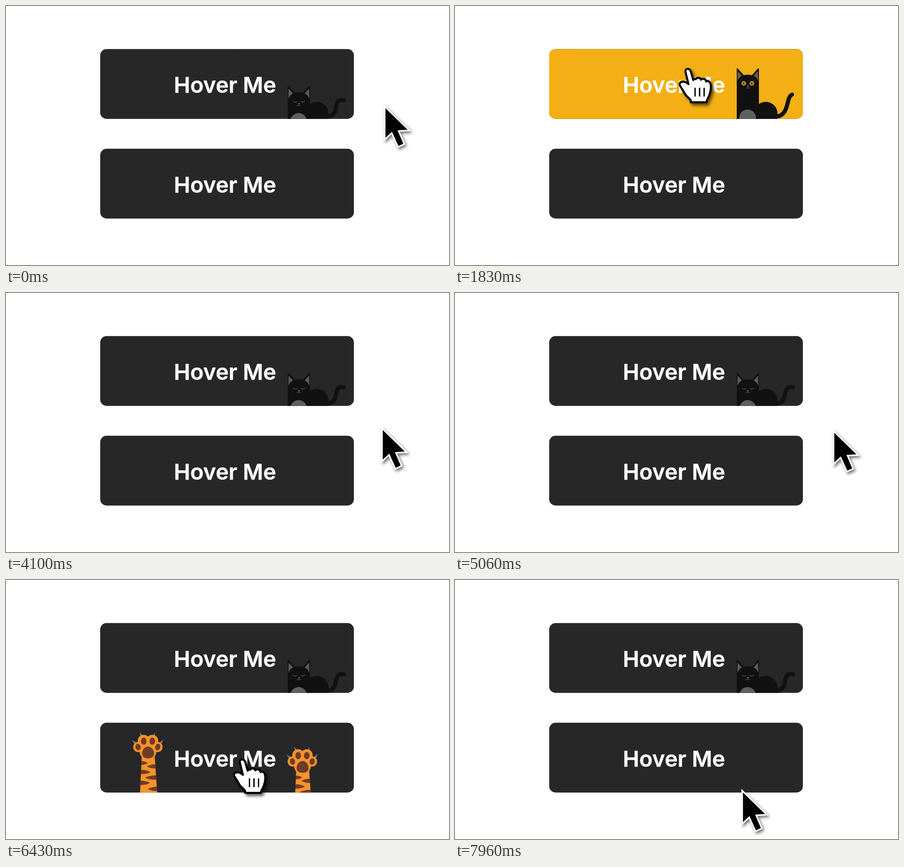
Write an HTML page that moves like this. It is 978 by 573 pixels and loops after 8 s.

```html
<!DOCTYPE html>
<html lang="en">
<head>
<meta charset="utf-8">
<title>Cat buttons</title>
<style>
  html, body { margin: 0; width: 100%; height: 100%; overflow: hidden; background: #fff; }
  svg { display: block; width: 100vw; height: 100vh; }
  text { font: 600 48.5px Inter, Roboto, sans-serif; fill: #fff; stroke: #fff; stroke-width: .5; stroke-linejoin: round; text-anchor: middle; }
  #arrow { filter: drop-shadow(3px 4px 3px rgba(0, 0, 0, .55)); }
  #hand { filter: drop-shadow(4px 5px 3px rgba(0, 0, 0, .6)); }
</style>
</head>
<body>
<svg viewBox="0 0 978 573">
  <defs>
    <rect id="box" x="208" y="95.3" width="560" height="154.4" rx="14"/>
    <clipPath id="clipTop"><use href="#box"/></clipPath>
    <clipPath id="clipLow"><use href="#box" y="220.5"/></clipPath>
    <g id="ear">
      <path d="M622 178.5Q622 175.5 624.5 177.5L640 195L622 212Z" fill="#111"/>
      <path d="M624 183L634.5 194.5Q626 198 623.4 206Z" fill="#5c5c5c"/>
    </g>
    <g id="eye">
      <circle r="5" fill="#f5bb24"/>
      <circle r="3.7" fill="none" stroke="#5d430c" stroke-width=".8"/>
      <ellipse rx="1.9" ry="2.3" fill="#111"/>
      <circle cx=".8" cy="-1" r=".6" fill="#fff"/>
    </g>
    <g id="paw">
      <g fill="#777">
        <path d="M295 337L302 344L297 347Z"/>
        <path d="M328 336L325.5 347L330 347Z"/>
        <path d="M278 354L287 359L284 364Z"/>
        <path d="M347.500 353L339 359L343 363Z"/>
      </g>
      <g fill="#f7932a">
        <path d="M300 385H328L331 430L334.500 480V620H295.500V480Z"/>
        <circle cx="292" cy="369.500" r="11.200"/>
        <circle cx="304" cy="355.500" r="13"/>
        <circle cx="323" cy="355.500" r="13"/>
        <circle cx="334.500" cy="369.500" r="11.200"/>
        <ellipse cx="313.500" cy="379" rx="18.500" ry="19"/>
      </g>
      <g fill="#6e3d24">
        <ellipse cx="291.500" cy="369.500" rx="5.800" ry="7.200" transform="rotate(-15 291.500 369.500)"/>
        <ellipse cx="304" cy="356.500" rx="6.200" ry="8"/>
        <ellipse cx="323" cy="356.500" rx="6.200" ry="8"/>
        <ellipse cx="335" cy="369.500" rx="5.800" ry="7.200" transform="rotate(15 335 369.500)"/>
        <path d="M313.500 368.500C321 368.500 327 376 327 384C327 392 320 394.500 313.500 394.500C307 394.500 300.500 392 300.500 384C300.500 376 306 368.500 313.500 368.500Z"/>
        <path d="M299.300 401Q308 401 313 405Q307 409 298.800 409Z"/>
        <path d="M329.500 407.500Q318 408 311 412.500Q319 417 330.200 417Z"/>
        <path d="M298.300 420Q312 420 319 425.500Q310 430 297.700 429.500Z"/>
        <path d="M331.200 432Q316 432.500 307 437.500Q318 442.500 332 442Z"/>
        <path d="M296.900 444Q310 444 318 449Q309 454 296.300 453.500Z"/>
        <path d="M333.300 457Q321 457.500 313 462.500Q322 467 334 467Z"/>
      </g>
    </g>
  </defs>

  <use href="#box" fill="#272727"/>
  <use id="glow" href="#box" fill="#f3af13"/>
  <use href="#box" y="220.5" fill="#272727"/>
  <text x="483.5" y="192">Hover Me</text>
  <text x="483.5" y="412.5">Hover Me</text>

  <g clip-path="url(#clipTop)">
    <path id="tail" fill="none" stroke="#111" stroke-width="9" stroke-linecap="round"/>
    <path d="M660 250V238A26 26 0 0 1 712 238V250Z" fill="#111"/>
    <g id="head">
      <use href="#ear"/>
      <use href="#ear" transform="matrix(-1 0 0 1 1293 0)"/>
      <path d="M622 320V213Q624 191 646.500 191Q669 191 671 213V320Z" fill="#111"/>
      <g id="lids" fill="none" stroke="#777" stroke-width="1" stroke-linecap="round">
        <path d="M633 210Q637 215 642 211.500"/>
        <path d="M660 210Q656 215 651 211.500"/>
      </g>
      <g id="eyes">
        <use href="#eye" x="637.500"/>
        <use href="#eye" x="655.500"/>
      </g>
      <path d="M644.300 215.500H648.700L646.500 218Z" fill="#999"/>
      <path d="M646.500 218V219.500Q645 222 641.800 220M646.500 219.500Q648 222 651.200 220" fill="none" stroke="#777" stroke-width=".9"/>
    </g>
    <circle id="chest" cx="646" cy="255.500" r="18.500" fill="#606060"/>
  </g>

  <g clip-path="url(#clipLow)">
    <use id="pawL" href="#paw"/>
    <use id="pawR" href="#paw"/>
  </g>

  <g id="arrow">
    <path d="M0 0V73.500L15.500 59L29.500 90L43.500 83.500L31 54.500L54.500 53.300Z" stroke="#fff" stroke-width="3.400"/>
  </g>
  <g id="hand">
    <g transform="translate(-514 -138)" stroke="#000" stroke-linejoin="round" stroke-linecap="round">
      <path fill="#fff" stroke-width="4.400" d="M516 139.300C511 138 507.500 141.500 509 146.500L515.500 173C512 169.500 509 168 504 167.500C497 167 494.500 171.500 497 176.500C500 182 504 187 507.500 194C510.500 200 519 204.500 520.500 209V213H555C555.500 207 561.500 200 562.500 194C564 188 566 184 564.500 175C564 167.500 559 164.500 554.500 167C553.500 161 547 159.500 543 163C541 157.500 534 157.500 531.500 162C530 160.500 527 161 526 164L520.500 144.500C519.500 141.500 518 140 516 139.300Z"/>
      <path fill="none" stroke-width="3" d="M530 182V199M540 182V199M550 182V199"/>
    </g>
  </g>
</svg>
<script>
  const LOOP = 8000;
  const el = id => document.getElementById(id);
  const clamp = v => Math.min(1, Math.max(0, v));
  const mix = (a, b, p) => a + (b - a) * p;
  const sineOut = u => Math.sin(u * Math.PI / 2);
  const smooth = u => u * u * (3 - 2 * u);
  const powOut = n => u => 1 - (1 - u) ** n;

  // Pointer moves: start, duration, end point, easing
  const home = [836, 222];
  const moves = [
    [190, 400, [514, 138], sineOut],
    [3205, 400, [830, 299], sineOut],
    [4850, 600, [850, 321], smooth],
    [6006, 400, [521.5, 396], sineOut],
    [7150, 400, [634, 466], sineOut]
  ];
  const catHover = [244, 3400];
  const pawHover = [6070, 7330];

  const tailDown = [708, 244.5, 723, 245, 727, 231, 729, 217, 733, 211.5, 737, 207, 746, 208.5];
  const tailUp = [708, 244.5, 722, 244.5, 729, 231, 733, 222, 735.5, 210, 738, 199, 744, 196];

  function pointer(t) {
    let at = home;
    for (const [start, span, end, ease] of moves) {
      if (t < start) break;
      const p = ease(clamp((t - start) / span));
      at = at.map((v, i) => mix(v, end[i], p));
    }
    return at;
  }

  // Progress 0..1 that rises on enter and falls on leave
  function hover(t, [enter, leave], rise, fall, ease) {
    if (t < leave) return ease(clamp((t - enter) / rise));
    return 1 - smooth(clamp((t - leave) / fall));
  }

  const within = (t, [a, b]) => t >= a && t < b;
  const move = (id, x, y) => el(id).setAttribute("transform", `translate(${x} ${y})`);

  function drawCat(t) {
    const lift = hover(t, catHover, 1050, 450, powOut(4));
    const open = hover(t, catHover, 220, 220, smooth);
    const curl = hover(t, catHover, 340, 400, smooth);
    el("glow").setAttribute("opacity", hover(t, catHover, 250, 250, smooth));
    move("head", 0, -39 * lift);
    move("chest", 0, -8 * lift);
    el("eyes").setAttribute("transform", `translate(0 210.3) scale(1 ${open})`);
    el("eyes").setAttribute("opacity", open > 0 ? 1 : 0);
    el("lids").setAttribute("opacity", 1 - open);
    const c = tailDown.map((v, i) => mix(v, tailUp[i], curl));
    el("tail").setAttribute("d",
      `M${c[0]} ${c[1]}Q${c.slice(2, 6)}Q${c.slice(6, 10)}Q${c.slice(10)}`);
  }

  function drawPaws(t) {
    const hidden = 140 * (1 - hover(t, pawHover, 320, 320, powOut(3)));
    const knead = 16 * Math.cos((t - 6430) * Math.PI / 350);
    move("pawL", 0, hidden + 16 - knead);
    move("pawR", 341, hidden + 16 + knead);
  }

  function drawPointer(t) {
    const [x, y] = pointer(t);
    const onButton = within(t, catHover) || within(t, pawHover);
    move("arrow", x, y);
    move("hand", x, y);
    el("arrow").style.display = onButton ? "none" : "";
    el("hand").style.display = onButton ? "" : "none";
  }

  function draw(t) {
    drawCat(t);
    drawPaws(t);
    drawPointer(t);
  }

  const begin = performance.now();
  function tick() {
    draw((performance.now() - begin) % LOOP);
    requestAnimationFrame(tick);
  }
  tick();
</script>
</body>
</html>
```
